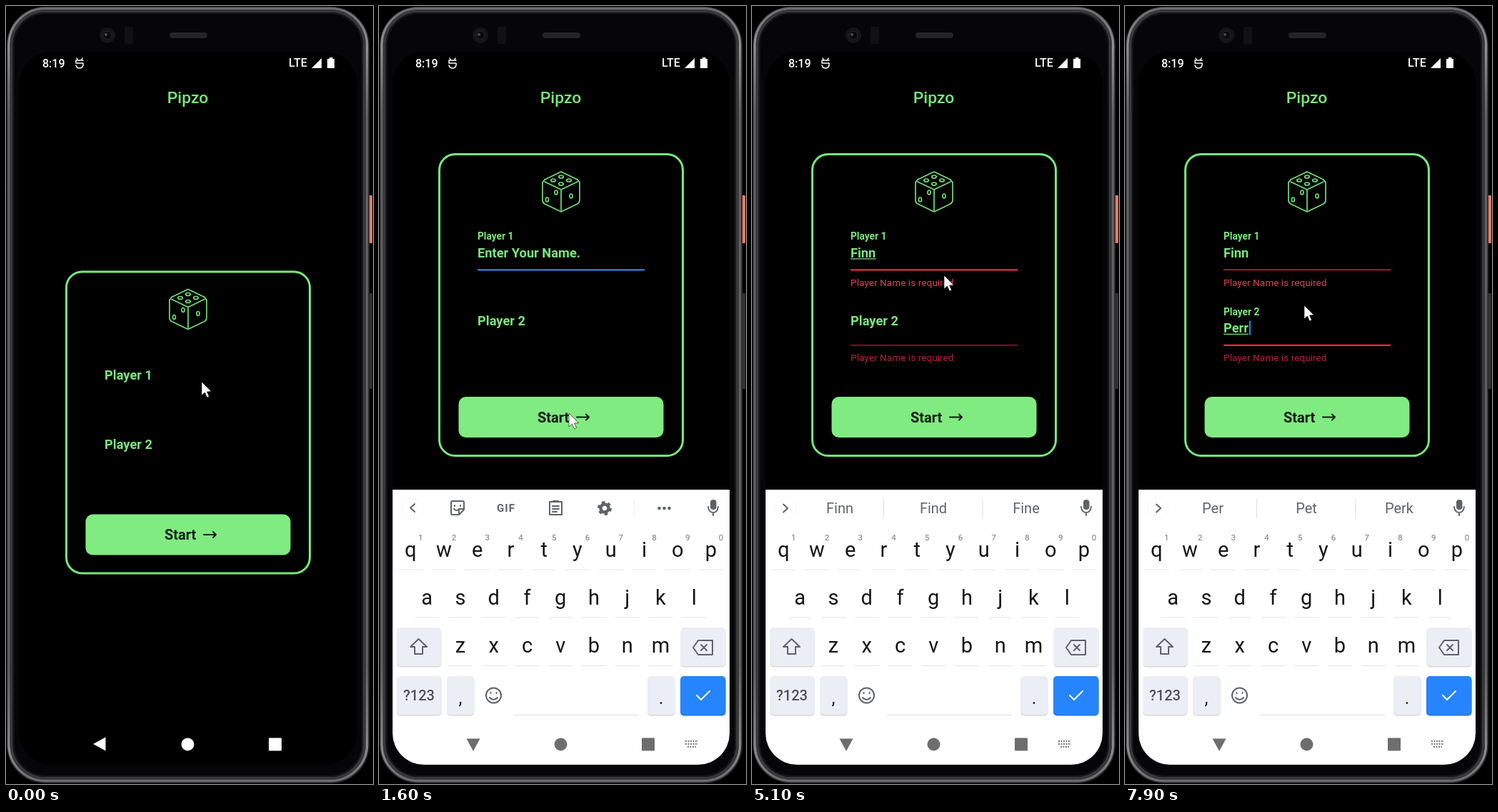
An HTML page for the animation above (8 s loop, 514 by 1089 pixels).

```html
<!DOCTYPE html>
<html lang="en">
<head>
<meta charset="utf-8">
<style>
html, body { margin: 0; width: 100%; height: 100%; overflow: hidden; background: #000; }
svg { display: block; width: 514px; height: 1089px; font-family: Roboto, sans-serif; }
.mid { text-anchor: middle; }
.bold { font-weight: 700; }
.line { fill: none; stroke-linecap: round; stroke-linejoin: round; }
text { white-space: pre; }
</style>
</head>
<body>
<svg id="stage" viewBox="0 0 514 1089">
  <defs>
    <clipPath id="screen"><rect x="19" y="64" width="472" height="998" rx="44"/></clipPath>
    <linearGradient id="metal" x2="0" y2="1">
      <stop stop-color="#6c6c6e"/><stop offset=".05" stop-color="#929294"/>
      <stop offset=".14" stop-color="#606062"/><stop offset=".85" stop-color="#606062"/>
      <stop offset=".96" stop-color="#8c8c8e"/><stop offset="1" stop-color="#6c6c6e"/>
    </linearGradient>
  </defs>
  <rect width="514" height="1089"/>
  <rect x="508" y="265" width="5" height="67" rx="1" fill="#e77c66"/>
  <rect x="508" y="402" width="5" height="134" rx="1" fill="#333"/>
  <g fill="#060608">
    <rect x="1" y="1" width="508" height="1087" rx="54" fill="#29292b"/>
    <rect x="4" y="3.500" width="501.500" height="1081" rx="51" stroke="url(#metal)" stroke-width="3.500"/>
    <rect x="7.500" y="7" width="494.500" height="1074" rx="48" stroke="#38383a" stroke-width="4"/>
    <rect x="10.500" y="10" width="488.500" height="1068" rx="45" stroke="#161618" stroke-width="2"/>
  </g>
  <circle cx="142" cy="41" r="11" fill="#151517"/><circle cx="142" cy="41" r="6" fill="#0a0a0c" stroke="#29292c"/>
  <circle cx="140" cy="40" r="2" fill="#4a4a50"/>
  <rect x="166" y="29" width="12" height="24" rx="2" fill="#111113"/>
  <rect x="229" y="37" width="53" height="8" rx="4" fill="#242426"/>
  <g clip-path="url(#screen)">
    <rect x="19" y="64" width="472" height="998"/>
    <g fill="#fff" font-size="16" font-weight="500">
      <text x="51" y="85.500">8:19</text><text x="396" y="85">LTE</text>
      <path d="M442 73V87H428ZM450 74H453V72H457.500V74H460V87H450Z"/>
      <path class="line" d="M108 76H98V80H108V83Q107 87 103 87T98 83M99 73L100 75M107 73L106 75" stroke="#fff" stroke-width="1.500"/>
    </g>
    <text class="mid" x="254.500" y="136" font-size="22.900" font-weight="500" fill="#77e878">Pipzo</text>
    <g id="card">
      <rect x="84.500" y="1.500" width="341" height="422" rx="22" fill="none" stroke="#78e87a" stroke-width="3"/>
      <g class="line" stroke="#72dd75" stroke-width="1.700">
        <path d="M232 37L255 26 278 37M281 41V66Q281 69 278 71L255 82 232 71Q229 69 229 66V41M232 40L255 51 278 40M255 51V80"/>
        <path d="M229 41L232 37M281 41L278 37"/>
        <ellipse cx="255" cy="33" rx="3.200" ry="2"/><ellipse cx="244" cy="38" rx="3.200" ry="2"/>
        <ellipse cx="266" cy="38" rx="3.200" ry="2"/><ellipse cx="255" cy="43" rx="3.200" ry="2"/>
        <ellipse cx="248" cy="55" rx="2" ry="3"/><ellipse cx="235.500" cy="65" rx="2" ry="3"/>
        <ellipse cx="269" cy="60" rx="2" ry="3"/>
      </g>
      <rect x="111.500" y="341" width="287" height="57" rx="10" fill="#80eb81"/>
      <text class="bold" x="222" y="376.500" font-size="20" fill="#0c1c0d">Start</text>
      <path class="line" d="M277 369.500H294M290 365.500L294 369.500 290 373.500" stroke="#0c1c0d" stroke-width="2"/>
    </g>
    <g id="fields"></g>
    <g id="keyboard">
      <rect x="19" y="677" width="472" height="470" fill="#fff"/>
      <g id="keys"></g>
      <g class="line" stroke="#5f6368" stroke-width="2">
        <path d="M55.500 886L67 897H61V907H50V897H44Z" id="shift"/>
        <path d="M447 888H467V908H447L440 898ZM451 894L459 902M459 894L451 902"/>
        <circle cx="160.500" cy="965" r="10.500"/><path d="M155 968Q160.500 974 166 968M156.500 961V962M164.500 961V962"/>
        <path d="M445 965L451 971 463 959" stroke="#fff"/>
      </g>
      <circle cx="47" cy="703" r="15" fill="#fff" stroke="#f8f8f8"/>
      <path class="line" id="chevron" stroke="#5f6368" stroke-width="2"/>
      <g stroke="#5f6368" stroke-width="2" class="line">
        <rect x="465" y="692" width="6.500" height="12" rx="3" fill="#5f6368"/>
        <path d="M461 701Q462 709 468 709T475 701M468 709V713"/>
      </g>
      <g id="tools">
        <g class="line" stroke="#5f6368" stroke-width="2">
          <path d="M103 693H117Q119 693 119 695V705L112 712H103Q101 712 101 710V695Q101 693 103 693M119 704H112V711M105 704Q109 708 112 704M106 699V700M114 699V700"/>
          <path d="M239 694H256V712H239ZM243 700H252M243 704H252M243 708H249M244 693H251"/>
          <circle cx="316" cy="703" r="5.500" stroke-width="4.500"/>
          <circle cx="316" cy="703" r="8.500" stroke-width="3" stroke-dasharray="4.450" stroke-linecap="butt"/>
        </g>
        <text class="mid bold" x="178" y="707.500" font-size="15" letter-spacing="1" fill="#5f6368">GIF</text>
        <path d="M357.500 690V716" stroke="#eee"/>
        <g fill="#5f6368"><circle cx="392.500" cy="703" r="2.300"/><circle cx="399.500" cy="703" r="2.300"/><circle cx="406.500" cy="703" r="2.300"/></g>
      </g>
      <g id="hints" class="mid" font-size="20" fill="#5f6368">
        <path d="M184.500 690V717M323 690V717" stroke="#ddd"/>
        <text x="123" y="710"></text><text x="254" y="710"></text><text x="384" y="710"></text>
      </g>
    </g>
    <g id="nav">
      <path id="back" d="M-10 0L7.500 -9.500V9.500Z"/>
      <circle cx="254.500" cy="1033.500" r="9"/><rect x="368" y="1024.500" width="18" height="18" rx="1"/>
      <path id="switch" d="M429 1029H447M429 1033H447M432 1037H444" stroke="#777" stroke-width="2" stroke-dasharray="2 1.500"/>
    </g>
  </g>
  <path id="mouse" d="M0 0V19L4.500 15 7.500 22 10.500 20.500 7.500 14 13.500 13.500Z" fill="#fff" stroke="#000" stroke-width=".6"/>
</svg>
<script>
const LOOP = 8000, STEP = 100;
const $ = id => document.getElementById(id);
const set = (el, attrs) => { for (const k in attrs) el.setAttribute(k, attrs[k]); };
const add = (parent, tag, attrs, text = '') => {
  const el = document.createElementNS('http://www.w3.org/2000/svg', tag);
  set(el, attrs);
  el.textContent = text;
  return parent.appendChild(el);
};
const ramp = (t, from, to) => Math.min(1, Math.max(0, (t - from) / (to - from)));
const mix = (a, b, p) => a + (b - a) * p;
const latest = (list, t) => list.filter(e => e[0] <= t).pop();
const within = (spans, t) => spans.some(([a, b]) => t >= a && t < b);

// Interpolates [time, ...values] rows.
function track(rows, t) {
  const i = rows.findIndex(r => r[0] > t);
  if (i === 0) return rows[0].slice(1);
  if (i < 0) return rows[rows.length - 1].slice(1);
  const a = rows[i - 1], b = rows[i], p = ramp(t, a[0], b[0]);
  return a.slice(1).map((v, k) => mix(v, b[k + 1], p));
}

const keys = $('keys'), letters = [];
function keyBox(x, y, w, fill = '#eceef5', shade = '#d5d7dd') {
  add(keys, 'rect', { x, y: y + 1.5, width: w, height: 54, rx: 5, fill: shade });
  add(keys, 'rect', { x, y, width: w, height: 54, rx: 5, fill });
}
[['qwertyuiop', 44.2, 770.5], ['asdfghjkl', 67.2, 837.5], ['zxcvbnm', 114, 905]].forEach(([row, x0, y], r) => {
  [...row].forEach((ch, i) => {
    const x = x0 + i * 46.75;
    add(keys, 'path', { d: `M${x - 17} ${y + 18.5}h34`, stroke: '#e4e4e4' });
    letters.push([add(keys, 'text', { class: 'mid', x, y, 'font-size': 29, fill: '#151515' }, ch), ch]);
    if (!r) add(keys, 'text', { class: 'mid', x: x + 14, y: 748, 'font-size': 11.5, fill: '#777' }, (i + 1) % 10);
  });
});
keyBox(25, 870, 62.5);
keyBox(422.5, 870, 63);
keyBox(25, 938, 62.5);
keyBox(95, 938, 38.5);
keyBox(376, 938, 38.5);
keyBox(422, 938, 63.5, '#2684fc', '#2272da');
add(keys, 'path', { d: 'M189 992.5H364', stroke: '#ddd' });
add(keys, 'text', { class: 'mid', x: 56, y: 972, 'font-size': 20, 'font-weight': 500, fill: '#4d5156' }, '?123');
add(keys, 'text', { class: 'mid', x: 114, y: 977, 'font-size': 25, fill: '#222' }, ',');
add(keys, 'text', { class: 'mid', x: 395, y: 977, 'font-size': 25, fill: '#222' }, '.');

const GREEN = '#7be67d', BLUE = '#2b87e8', RED = '#ea2b44', DARK_RED = '#9c172d';
const carets = [[200, 800], [1200, 1500], [1900, 2400], [3500, 4500], [6000, 6600], [7200, LOOP]];

const makeField = (label, rest, lift, focus, blur, typed, errorFill) => {
  const root = add($('fields'), 'g', {});
  const text = { class: 'bold', 'font-size': 18.3, fill: GREEN };
  return {
    rest, lift, focus, blur, typed, root,
    label: add(root, 'text', text, label),
    value: add(root, 'text', { ...text, x: 138, y: 16.5 }),
    underline: add(root, 'path', { stroke: GREEN, 'stroke-width': 1.3 }),
    line: add(root, 'path', { d: 'M138 34.3H372' }),
    error: add(root, 'text', { x: 138, y: 56.5, 'font-size': 13.7, fill: errorFill }, 'Player Name is required'),
    caret: add(root, 'rect', { y: 0, width: 2, height: 20, fill: BLUE }),
  };
};
const fields = [
  makeField('Player 1', 146, 17, 100, 5800,
    [[0, ''], [3500, 'F'], [4000, 'Fi'], [4200, 'Fin'], [4400, 'Finn']], '#e03e50'),
  makeField('Player 2', 242.5, 8, 5800, LOOP,
    [[0, ''], [7200, 'P'], [7700, 'Pe'], [7800, 'Per'], [7900, 'Perr']], '#b8203c'),
];

function drawField(f, t, cardTop) {
  const focused = t >= f.focus && t < f.blur;
  const float = ramp(t, f.focus, f.focus + 200);
  const typed = latest(f.typed, t)[1];
  const base = cardTop + f.rest - (t >= 1500 ? f.lift : 0);
  set(f.root, { transform: `translate(0 ${base})` });
  set(f.label, { transform: `translate(138 ${mix(6.5, -8, float)}) scale(${mix(1, .75, float)})` });
  f.value.textContent = typed || 'Enter Your Name.';
  set(f.value, { opacity: typed ? 1 : float });
  const width = typed ? f.value.getComputedTextLength() : 0;
  set(f.underline, { d: typed && focused ? `M138 18.8h${width}` : '' });
  set(f.line, {
    stroke: t < 1700 ? (focused ? BLUE : 'none') : focused ? RED : typed ? '#d0273d' : DARK_RED,
    'stroke-width': focused ? 2.2 : 1.5,
  });
  set(f.error, { opacity: ramp(t, 1600, 1900) });
  set(f.caret, { x: 138 + width + (typed ? 1 : 0), opacity: focused && within(carets, t) ? 1 : 0 });
}

const hints = [
  [0], [3500, 'F', 'For', 'From'], [4000, 'Fi', 'Fit', 'Fig'], [4200, 'Fin', 'Fun', 'Find'],
  [4500, 'Finn', 'Find', 'Fine'], [5800], [7200, 'P', 'Put', 'Play'], [7700, 'Pe', 'Pen', 'Pet'],
  [7900, 'Per', 'Pet', 'Perk'],
];
const pointer = [
  [0, 274, 526], [800, 274, 526], [1200, 266, 570], [1900, 266, 570], [2500, 279, 346],
  [4900, 279, 346], [5100, 269, 377], [5300, 251, 419],
];

function draw(time) {
  const t = Math.floor(time / STEP) * STEP;
  const [slide, rise] = track([[100, 0, 0], [200, .5, .3], [300, .857, .71], [400, .97, .93], [500, 1, 1]], t);
  const cardTop = mix(370.5, 206, rise);
  set($('card'), { transform: `translate(0 ${cardTop})` });
  fields.forEach(f => drawField(f, t, cardTop));

  set($('keyboard'), { transform: `translate(0 ${385 * (1 - slide)})` });
  const caps = t >= 7100 && t < 7400;
  letters.forEach(([el, ch]) => { el.textContent = caps ? ch.toUpperCase() : ch; });
  set($('shift'), { fill: caps ? '#5f6368' : 'none' });
  const words = latest(hints, t).slice(1), open = words.length > 0;
  set($('hints'), { opacity: +open });
  set($('tools'), { opacity: +!open });
  set($('chevron'), { d: open ? 'M44 697.5L50 703 44 708.5' : 'M50 697L44 702.5 50 708' });
  $('hints').querySelectorAll('text').forEach((el, i) => { el.textContent = words[i] || ''; });

  const turn = ramp(t, 100, 400);
  set($('nav'), { fill: t < 200 ? '#fff' : '#6e6e6e' });
  set($('back'), { transform: `translate(132 1033) rotate(${-90 * turn})` });
  set($('switch'), { opacity: turn });
  const [x, y] = track(pointer, t);
  set($('mouse'), { transform: `translate(${x} ${y})` });
}

const start = performance.now();
function tick() {
  draw((performance.now() - start) % LOOP);
  requestAnimationFrame(tick);
}
tick();
</script>
</body>
</html>
```
